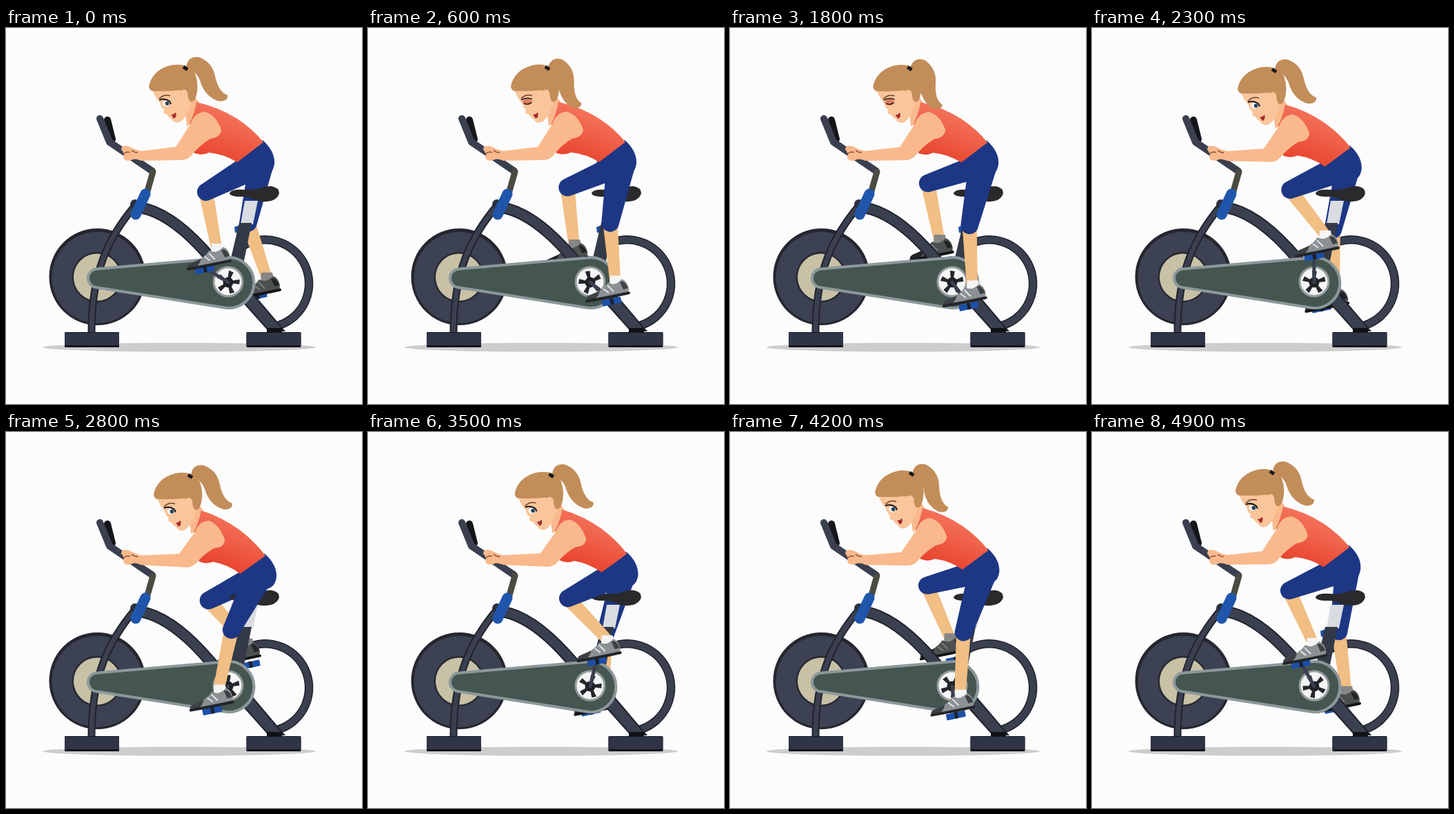
Write an HTML page that moves like this. It is 516 by 544 pixels and loops after 5000 ms.

```html
<!DOCTYPE html>
<html lang="en">
<head>
<meta charset="utf-8">
<title>Exercise bike</title>
<style>
html, body { margin: 0; width: 100%; height: 100%; overflow: hidden; background: #fcfcfc }
svg { display: block; width: 516px; height: 544px }
.line { fill: none; stroke: #3a4050; stroke-linecap: round; stroke-linejoin: round }
.edge { stroke: #20232c }
.skin { fill: #f9b98c }
.shin { fill: #f1be84 }
.blue { fill: #1d3785 }
.hair { fill: #c28d59 }
</style>
</head>
<body>
<svg viewBox="0 0 516 544">
  <defs>
    <linearGradient id="shirt" gradientUnits="userSpaceOnUse" x1="325" y1="120" x2="300" y2="190">
      <stop offset="0" stop-color="#f4745c"/><stop offset="1" stop-color="#e9452f"/>
    </linearGradient>
    <g id="pedal">
      <rect x="-14" y="-4" width="28" height="9" rx="1" fill="#1c4fa8"/>
      <path d="M-2,-4h5v9h-5z" fill="#1b2030"/>
    </g>
    <g id="shoe">
      <path d="M-7,-5L9,-5 11,5 -8,9Z" fill="#f4f4f4"/>
      <path d="M-10,5Q0,11 10,0Q18,3 20,14L19,20Q-10,24 -39,32Q-45,29 -38,24Q-19,18 -10,5Z" fill="#8b9192"/>
      <path d="M-42,30Q-43,26 -36,23L-22,17Q-24,25 -30,30ZM7,4Q14,1 19,13L12,15Z" fill="#3d4144"/>
      <path d="M-11,9L-2,18M-17,14L-9,20" stroke="#e2e5e5" stroke-width="2"/>
      <path d="M-41,32Q-12,27 20,20" fill="none" stroke="#232528" stroke-width="4" stroke-linecap="round"/>
    </g>
  </defs>

  <ellipse cx="251" cy="462" rx="198" ry="6.5" fill="#cdcdcd"/>
  <path id="rim" d="M342,316A63.5,63.5 0 1 1 396,430" class="line edge" stroke-width="12.5"/>
  <use href="#rim" style="display:none"/>
  <path d="M342,316A63.5,63.5 0 1 1 396,430" class="line" stroke-width="9.5"/>

  <g id="far">
    <use href="#pedal"/><path class="shin"/><path class="blue"/><use href="#shoe" style="filter:brightness(.55)"/>
  </g>

  <circle cx="132.5" cy="360" r="70" fill="#25262e"/>
  <circle cx="132.5" cy="361" r="66" fill="#3c4153"/>
  <circle cx="132" cy="360.5" r="36.5" fill="#272932"/>
  <circle cx="132" cy="360.5" r="34" fill="#c8c1a6"/>

  <path d="M346,250H365L358,284H340Z" fill="#d9dce1"/>
  <path d="M331,288l8,-3v12l-7,-1z" fill="#1f4f9f"/>
  <path d="M338,282H356L345,337H325Z" fill="#343947"/>
  <path d="M189,259Q238,264 296,332L340,384" class="line edge" stroke-width="17" stroke-linecap="butt"/>
  <path d="M189,259Q238,264 296,332L340,384" class="line" stroke-width="13"/>
  <path d="M338,390L352,378 403,438H381Z" class="edge" fill="#3a4050" stroke-width="2"/>
  <path d="M187,257C149,302 124,352 124,440" class="line edge" stroke-width="11"/>
  <path d="M187,257C149,302 124,352 124,440" class="line" stroke-width="7"/>
  <path d="M378,434H400V441H378Z" fill="#101218"/>
  <g id="base">
    <rect x="85" y="440" width="79" height="22" rx="1" fill="#14161e"/>
    <rect x="85" y="441" width="79" height="18" fill="#2f3546"/>
  </g>
  <use href="#base" x="263.5"/>

  <path d="M147,133L154,161" class="line" style="stroke:#15161a" stroke-width="10"/>
  <path d="M136,131L150,165 212,207" class="line" stroke-width="10"/>
  <path d="M213,208L205,236" class="line" style="stroke:#4b4b42" stroke-width="9"/>
  <circle cx="187" cy="255" r="7" fill="#2b303d"/>
  <path d="M202,240L188,270" class="line" style="stroke:#1f56ab" stroke-width="15"/>

  <path d="M133,348.5L318,332.5A36.5,36.5 0 1 1 316,404.5L132,375.5A13.5,13.5 0 0 1 133,348.5Z"
    fill="#45554f" stroke="#8c989b" stroke-width="4"/>
  <circle cx="322" cy="367" r="21" fill="#f5f5f5" stroke="#949b9f" stroke-width="3"/>
  <g id="ring"></g>
  <circle cx="322" cy="368" r="7.5" fill="#1d2024"/>

  <path d="M324,239Q326,233 345,234C365,236 370,228 385,229Q396,231 396,239Q393,250 378,251C362,253 358,243 340,244Q325,244 324,239Z" fill="#2a2a2d"/>

  <path id="crank" class="line" stroke-width="5"/>
  <g id="near">
    <use href="#pedal"/><path class="shin"/><path class="blue"/><use href="#shoe"/>
  </g>

  <path class="blue" data-d="M331,194L372,162Q390,178 389,196Q387,214 368,214L345,209Z"/>
  <path class="skin" data-d="M259,116L274,100 284,114 278,132 262,142Z"/>
  <path fill="url(#shirt)" data-d="M276,107Q308,114 335,131Q358,146 373,165L335,194Q316,182 294,180Q284,185 273,181Q268,172 276,160L266,138Q273,124 276,107Z"/>
  <path class="skin" data-d="M267,139Q273,122 288,121Q304,125 312,147Q311,158 296,160Q284,167 272,180Q265,191 255,191L196,192Q187,188 182,191Q172,194 170,187Q172,181 167,176Q167,169 178,171Q186,176 196,178L246,172Q257,155 267,139Z"/>
  <path data-d="M170,183Q174,178 180,180M182,177Q187,181 191,180" fill="none" stroke="#7a3d2d" stroke-width="1.3"/>

  <g id="head">
    <path id="tail" class="hair" d="M261,57Q263,40 279,42Q299,49 303,70Q308,93 321,97Q322,106 309,106Q291,101 283,82Q279,66 268,61Z"/>
    <path class="skin" style="fill:#fac59b" d="M211,85Q214,99 223,108Q224,115 229,118Q226,124 233,125Q236,130 240,132Q244,139 252,136Q262,130 268,110L268,82 225,80Z"/>
    <path class="hair" d="M207,84Q212,61 238,54Q263,49 274,66Q281,85 274,103Q268,110 265,104L262,94 252,90Q232,92 211,91Q207,88 207,84Z"/>
    <ellipse cx="258" cy="97" rx="5.5" ry="8" fill="#fac59b"/>
    <path d="M257,56L263,60" stroke="#17171b" stroke-width="5"/>
    <path d="M222,102Q229,95 238,98" fill="none" stroke="#6b422a" stroke-width="1.5"/>
    <g id="open">
      <ellipse cx="232" cy="109" rx="5" ry="4" fill="#fff"/>
      <circle cx="233.5" cy="109" r="2.9" fill="#27465e"/>
      <path d="M222,104Q230,101 237,106L239,110" fill="none" stroke="#17171b" stroke-width="2"/>
    </g>
    <g id="shut">
      <ellipse cx="231" cy="107" rx="7" ry="4" fill="#d9805f"/>
      <path d="M222,104Q230,100 238,103M226,109Q231,112 237,108" fill="none" stroke="#43231d" stroke-width="1.7"/>
    </g>
    <path d="M239,125Q243,126 246,122Q248,129 243,131Z" fill="#a62b2a"/>
  </g>
</svg>
<script>
const $ = id => document.getElementById(id);
const clamp = v => Math.max(0, Math.min(1, v));
const rad = Math.PI / 180;
const soft = [...document.querySelectorAll("[data-d]")];
const spoke = '<path d="M-3,-17L4,-16 2,-6 -2,-6Z" fill="#24282c" transform="rotate(A)"/>';
$("ring").innerHTML = [0, 72, 144, 216, 288].map(a => spoke.replace("A", a)).join("");

// Point on a circle, starting at the top and turning towards the front;
// lead makes the sideways part run ahead
const orbit = (x, y, r, a, lead = 0) => [x - r * Math.sin(a + lead), y - r * Math.cos(a)];

function limb([x1, y1], r1, [x2, y2], r2) {
  const d = Math.hypot(x2 - x1, y2 - y1), nx = (y1 - y2) / d, ny = (x2 - x1) / d;
  return `M${x1 + nx * r1},${y1 + ny * r1}A${r1},${r1} 0 0 1 ${x1 - nx * r1},${y1 - ny * r1}` +
    `L${x2 - nx * r2},${y2 - ny * r2}A${r2},${r2} 0 0 1 ${x2 + nx * r2},${y2 + ny * r2}Z`;
}

function findKnee(hip, ankle) {
  const dx = ankle[0] - hip[0], dy = ankle[1] - hip[1], d = Math.hypot(dx, dy);
  const k = Math.max(1, (d + 1.5) / 169), thigh = 88 * k, shin = 81 * k;
  const a = (d * d + thigh * thigh - shin * shin) / (2 * d);
  const h = Math.sqrt(thigh * thigh - a * a);
  return [hip[0] + (dx * a - dy * h) / d, hip[1] + (dy * a + dx * h) / d];
}

function poseLeg(id, hip, ankle, pedal, hipR) {
  const knee = findKnee(hip, ankle), [p, shin, thigh, shoe] = $(id).children;
  p.setAttribute("transform", `translate(${pedal}) rotate(-12)`);
  shin.setAttribute("d", limb(knee, 10.5, ankle, 8));
  thigh.setAttribute("d", limb(hip, hipR, knee, 12.8));
  shoe.setAttribute("transform", `translate(${ankle})`);
}

// Upper body rocks while the hands stay on the bar
function warp(d, s) {
  return d.replace(/(\d+),(\d+)/g, (_, x, y) => {
    const w = clamp((x - 270) / 100), k = s * clamp((x - 190) / 80);
    return `${+x + k * (7 - 4 * w)},${+y + k * (6 + 8 * w)}`;
  });
}

function draw(ms) {
  const deg = (58 + 28.8 * Math.floor(ms % 5000 / 100)) % 360, a = deg * rad;
  const s = (1 - Math.cos(2 * (a - 50 * rad))) / 2;
  const swing = Math.max(0, Math.cos(a - 215 * rad)) ** 4;

  const pedal = orbit(322, 368, 40, a);
  const ankle = [pedal[0] + 11 + 6 * Math.cos(a - 45 * rad), pedal[1] - 30];
  poseLeg("near", [367 + 2 * s, 195 + 8 * s], ankle, [pedal[0], pedal[1] + 2], 21);
  const b = a + Math.PI;
  poseLeg("far", [370 + 2 * s, 196 + 8 * s], orbit(337, 337, 41, b, 20 * rad), orbit(332, 367, 38, b), 18);

  $("crank").setAttribute("d", `M322,368L${pedal}`);
  $("ring").setAttribute("transform", `translate(322 368) rotate(${-deg})`);
  soft.forEach(p => p.setAttribute("d", warp(p.dataset.d, s)));
  $("head").setAttribute("transform", `translate(${7 * s} ${6 * s})`);
  $("tail").setAttribute("transform", `rotate(${16 * swing} 265 56)`);

  const blink = deg > 200 && deg < 240;
  $("open").style.display = blink ? "none" : "";
  $("shut").style.display = blink ? "" : "none";
}

const start = performance.now();
function tick() {
  draw(performance.now() - start);
  requestAnimationFrame(tick);
}
tick();
</script>
</body>
</html>
```
